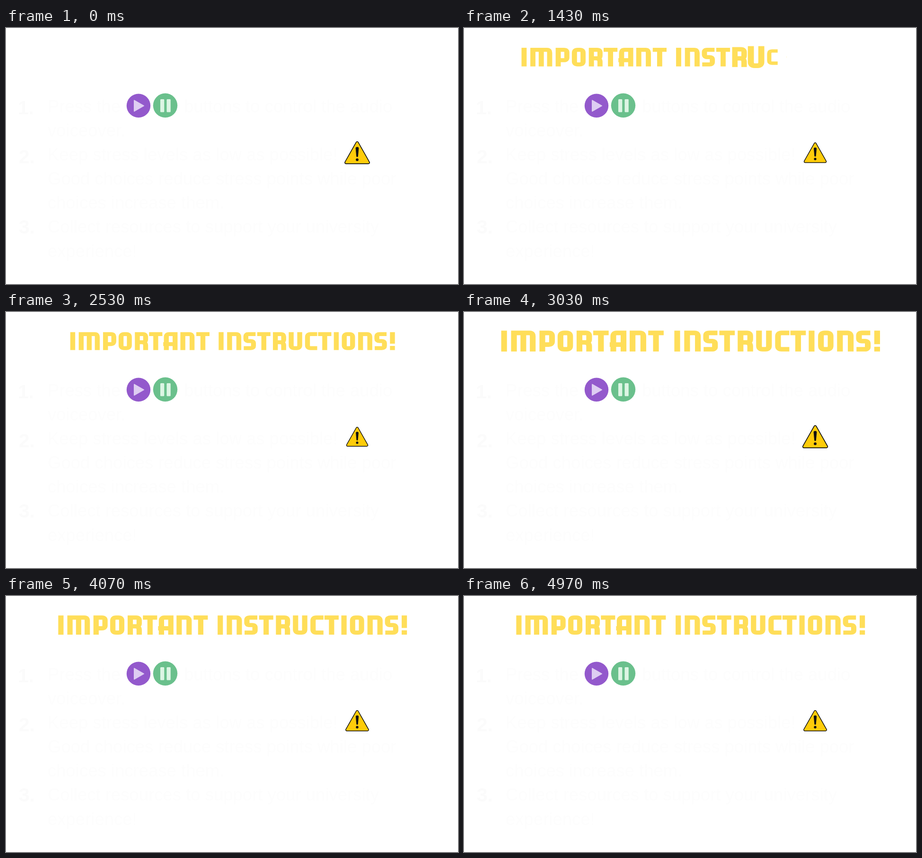
Animation of 955 by 543 pixels, one loop 5.01 s. Source, as an HTML page:

```html
<!DOCTYPE html>
<html lang="en">
<head>
<meta charset="utf-8">
<title>Important instructions</title>
<style>
  html, body { margin: 0; width: 100%; height: 100%; overflow: hidden; background: #fff; }
  svg { display: block; width: 955px; height: 543px; }
  text { font: 36.5px "Liberation Sans", Arial, sans-serif; fill: #fdfdfd; }
  .num { font-weight: bold; font-size: 41px; fill: #fbfbfb; }
  #title path { fill: none; stroke: #ffde59; stroke-width: 10.4; }
</style>
</head>
<body>
<svg viewBox="0 0 955 543">
  <g id="copy"></g>
  <circle cx="280" cy="164.800" r="25.200" fill="#9359cc"/>
  <path d="M271 153.500V176.500L291 165Z" fill="#decdf2" stroke="#decdf2" stroke-width="2" stroke-linejoin="round"/>
  <circle cx="336.500" cy="164.300" r="25.700" fill="#6ac08c"/>
  <g fill="#dcf5e4">
    <rect x="326" y="151" width="8.300" height="27.500" rx="1.500"/>
    <rect x="339.500" y="151" width="8.300" height="27.500" rx="1.500"/>
  </g>
  <g id="warning">
    <g stroke-linejoin="round">
      <path d="M0-18L20.300 18H-20.300Z" stroke="#111" stroke-width="5.800"/>
      <path d="M0-18L20.300 18H-20.300Z" fill="#ffcc0a" stroke="#ffcc0a" stroke-width="3"/>
    </g>
    <path d="M-2.900-8Q-2.900-10.500 0-10.500T2.900-8L1.600 6.500Q1.400 8 0 8T-1.600 6.500Z" fill="#111"/>
    <circle cy="12.800" r="2.500" fill="#111"/>
  </g>
  <g id="title" role="img" aria-label="IMPORTANT INSTRUCTIONS!"></g>
</svg>
<script>
const LOOP = 5010, FPS = 30;
const PULSE = 27, PEAK = 1.327;
const CENTER = { x: 478.5, y: 61.7 };
const GRID = 48, CAP = 38; // lettering is drawn tall, then squashed so bars are thinner than stems
const $ = id => document.getElementById(id);

function add(parent, tag, attrs, text = "") {
  const el = document.createElementNS("http://www.w3.org/2000/svg", tag);
  for (const key in attrs) el.setAttribute(key, attrs[key]);
  el.textContent = text;
  return parent.appendChild(el);
}

// Body copy: x, baseline, text, class
[
  [25, 183, "1.", "num"], [88, 179, "Press the"], [376, 179, "buttons to control the audio"],
  [88, 230, "voiceover."],
  [27, 287, "2.", "num"], [88, 281, "Keep stress levels as low as possible!"],
  [88, 332, "Good choices reduce stress points while poor"],
  [88, 383, "choices increase them."],
  [27, 436, "3.", "num"], [88, 434, "Collect resources to support your university"],
  [88, 486, "experience!"]
].forEach(([x, y, line, cls = ""]) => add($("copy"), "text", { x, y, class: cls }, line));

// Display lettering: advance width and centre lines
const GLYPHS = {
  I: [11, "M5.5 0V48"],
  M: [45, "M5.5 48V5.2H34Q39.5 5.2 39.5 13V48M22.5 5.2V48"],
  P: [28.5, "M5.5 48V5.2H17Q23 5.2 23 12V25Q23 32 17 32H5"],
  O: [28.5, "M12 5.2H16.500Q23 5.2 23 13V35Q23 42.800 16.500 42.800H12Q5.500 42.800 5.500 35V13Q5.500 5.200 12 5.200Z"],
  R: [28.5, "M5.5 48V5.2H17Q23 5.2 23 12V20Q23 27 17 27H5M15 27Q23 27 23 36V48"],
  T: [28, "M0 5.2H28M14 5.2V48"],
  A: [30.5, "M6.5 48V13Q6.5 5.2 12.500 5.2H25V48M0 32H25"],
  N: [30.5, "M5.5 48V5.2H19Q25 5.2 25 13V48"],
  S: [27, "M26 5.2H11Q5.500 5.2 5.500 11V18Q5.500 24 11 24H16Q21.500 24 21.500 30V37Q21.500 42.800 16 42.800H1"],
  U: [29, "M5.5 0V35Q5.5 42.8 12 42.8H17Q23.5 42.8 23.5 35V0"],
  C: [26, "M26 5.2H12Q5.5 5.2 5.5 13V35Q5.5 42.8 12 42.8H26"],
  "!": [11, "M5.5 0V31M5.5 37V48"]
};
const WORDS = [
  { text: "IMPORTANT", x: 135.5, end: 430, gaps: [7, 6.5, 4.5, 6, 2, 2, 5.5, 3.5] },
  { text: "INSTRUCTIONS!", x: 449, end: 822, gaps: [7, 4, 2.5, 5, 5, 5.5, 2, 5, 6, 6, 4, 6] }
];

const letters = [];
let order = 0;
for (const { text, x, end, gaps } of WORDS) {
  const chars = [...text];
  const sum = list => list.reduce((a, b) => a + b, 0);
  const widths = chars.map(c => GLYPHS[c][0]);
  const slack = (end - x - sum(widths) - sum(gaps)) / gaps.length;
  let left = x;
  chars.forEach((c, i) => {
    letters.push({
      el: add($("title"), "path", { d: GLYPHS[c][1] }),
      cx: left + widths[i] / 2 - CENTER.x,
      half: widths[i] / 2,
      start: 0.07 + 0.08 * order++
    });
    left += widths[i] + (gaps[i] || 0) + slack;
  });
  order++; // the space takes a turn too
}

// Quick swell, then a longer quadratic relaxation
function pulse(frame) {
  const rise = 10.2, fall = PULSE - rise;
  const p = (((frame - 22) % PULSE) + PULSE) % PULSE;
  const level = p < rise
    ? (1 - Math.cos(Math.PI * p / rise)) / 2
    : ((PULSE - p) / fall) ** 2;
  return 1 + (PEAK - 1) * level;
}

// Letter pop: grows past full size, then settles
function pop(age) {
  if (age <= 0) return 0;
  if (age < 0.12) return age * 10;
  const rest = Math.max(0, 1 - (age - 0.12) / 0.2);
  return 1 + 0.2 * rest * rest * (3 - 2 * rest);
}

function render(ms) {
  const frame = Math.floor((ms % LOOP + 5) * FPS / 1000);
  const scale = pulse(frame);
  $("warning").setAttribute("transform", `translate(742 264.5) scale(${scale})`);
  $("title").setAttribute("transform", `translate(${CENTER.x} ${CENTER.y}) scale(${scale})`);
  for (const { el, cx, half, start } of letters) {
    const size = pop(frame / FPS - start);
    el.style.display = size ? "" : "none";
    el.setAttribute("transform",
      `translate(${cx} 0) scale(${size} ${size * CAP / GRID}) translate(${-half} ${-GRID / 2})`);
  }
}

const begin = performance.now();
function tick() {
  render(performance.now() - begin);
  requestAnimationFrame(tick);
}
tick();
</script>
</body>
</html>
```
